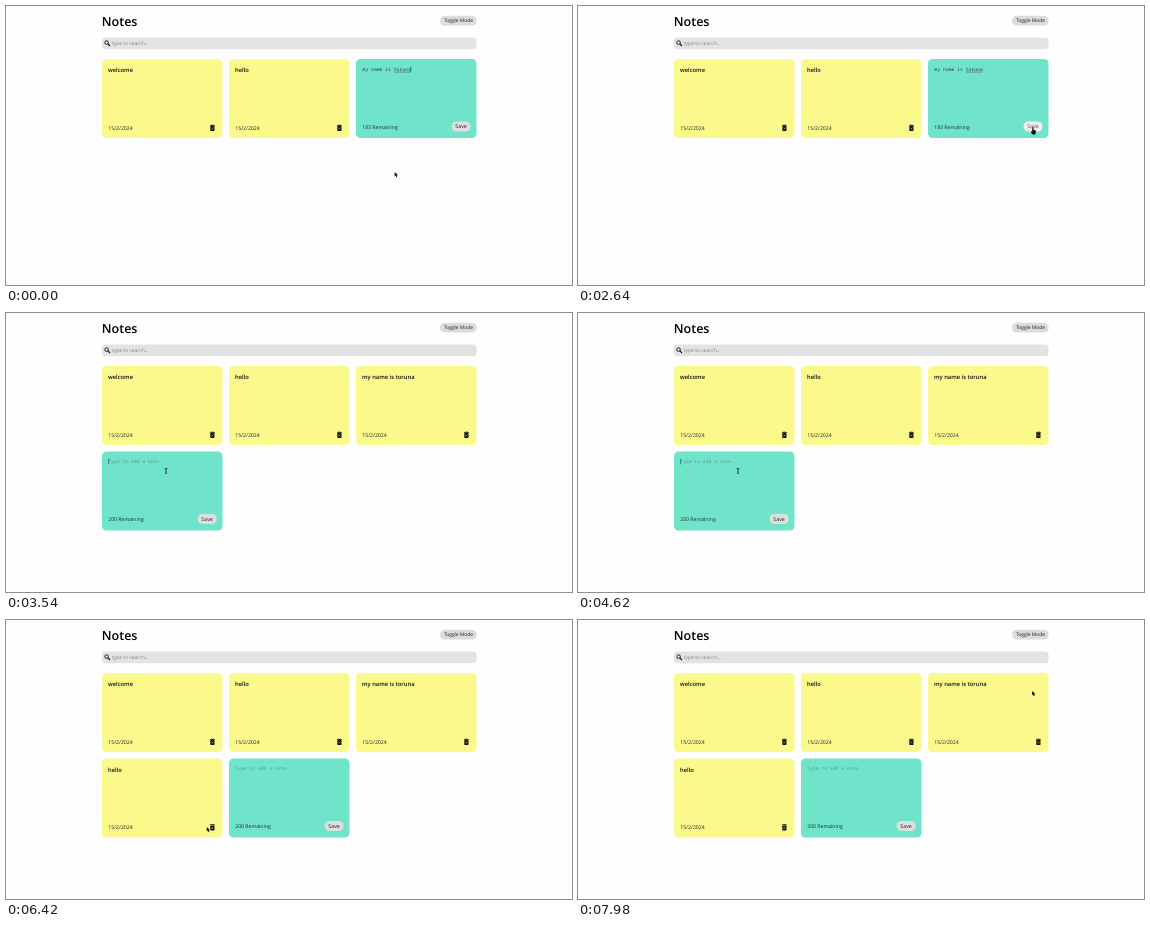
An HTML page with a canvas that plays this animation: 566 px wide and 279 px high, repeating every 8 s.

```html
<!DOCTYPE html>
<html lang="en">
<head>
<meta charset="utf-8">
<title>Notes</title>
<style>
  html, body { margin: 0; width: 100%; height: 100%; overflow: hidden; background: #fefefe; }
  canvas { display: block; width: 566px; height: 279px; }
</style>
</head>
<body>
<canvas id="stage"></canvas>
<script>
const W = 566, H = 279, LOOP = 8000;
const SANS = '"Open Sans", "Noto Sans", sans-serif';
const MONO = '"Noto Sans Mono", "DejaVu Sans Mono", monospace';
const CHAR = 2.84, MONO_SIZE = CHAR / 0.6;
const COLS = [96, 223, 350], ROWS = [53, 138.5];
const CARD = { w: 120.5, h: 79 };
const INTRO = 'my name is ', NAME = 'toruna';

const SAVE_1 = 2760, FOCUS = 3420, SAVE_2 = 6400;
const KEYS = [4920, 5130, 5250, 5370, 5490];
const BLINK = 1060;

// pointer stops: time, x, y
const PATH = [
  [0, 388.7, 166], [870, 388.7, 166], [1130, 429.5, 94.5], [1900, 429.5, 94.5],
  [2380, 454.8, 121.3], [2900, 454.8, 121.3], [3330, 160, 158], [5890, 160, 158],
  [6120, 196, 221], [6300, 200.8, 207], [6440, 200.8, 207], [6600, 200.8, 210],
  [6780, 200.8, 210], [7450, 454.2, 71], [LOOP, 454.2, 71]
];

const canvas = document.getElementById('stage');
const ctx = canvas.getContext('2d');
const ratio = window.devicePixelRatio || 1;
canvas.width = Math.round(W * ratio);
canvas.height = Math.round(H * ratio);
ctx.scale(ratio, ratio);
if ('textRendering' in ctx) ctx.textRendering = 'geometricPrecision';

function text(str, x, y, size, color = '#222', weight = 400, family = SANS, align = 'left') {
  ctx.font = `${weight} ${size}px ${family}`;
  ctx.fillStyle = color;
  ctx.textAlign = align;
  ctx.fillText(str, x, y);
}

function box(x, y, w, h, r, color) {
  ctx.fillStyle = color;
  ctx.beginPath();
  ctx.roundRect(x, y, w, h, r);
  ctx.fill();
}

function line(points, color, width) {
  ctx.strokeStyle = color;
  ctx.lineWidth = width;
  ctx.beginPath();
  points.forEach(([x, y]) => ctx.lineTo(x, y));
  ctx.stroke();
}

function shape(points) {
  ctx.beginPath();
  points.forEach(([x, y]) => ctx.lineTo(x, y));
  ctx.closePath();
  ctx.fillStyle = '#000';
  ctx.fill();
}

function header() {
  text('Notes', 95.8, 19.7, 12.5, '#000', 600);
  box(434, 9.8, 36.7, 9.8, 4.9, '#dcdcdc');
  text('Toggle Mode', 452.4, 16.4, 4.9, '#222', 400, SANS, 'center');
  box(95.8, 31.5, 374.8, 11.7, 3.6, '#e3e3e4');
  ctx.strokeStyle = '#111';
  ctx.lineWidth = 0.9;
  ctx.beginPath();
  ctx.arc(100.6, 36.6, 1.8, 0, Math.PI * 2);
  ctx.stroke();
  line([[101.9, 37.9], [104, 40]], '#111', 1.1);
  text('type to search...', 105.8, 38.9, 5, '#858585');
}

function bin(x, y) {
  box(x - 2.1, y - 1.7, 4.2, 4.8, 0.6, '#111');
  box(x - 2.5, y - 2.8, 5, 0.7, 0, '#111');
  box(x - 1.2, y - 3.1, 2.4, 0.6, 0, '#111');
  line([[x - 0.9, y - 0.2], [x + 0.9, y + 1.6]], '#cfcd7a', 0.55);
  line([[x + 0.9, y - 0.2], [x - 0.9, y + 1.6]], '#cfcd7a', 0.55);
}

function note(x, y, str) {
  box(x, y, CARD.w, CARD.h, 4.5, '#fbf98c');
  text(str, x + 6, y + 13.2, 5.8, '#111', 600);
  text('15/2/2024', x + 6.2, y + 70.7, 5.2);
  bin(x + 110.4, y + 68.8);
}

function saveArea(e) {
  return { x: e.x + 95.6, y: e.y + 62.4, w: 19, h: 10.2 };
}

function inside(p, b) {
  return p.x >= b.x && p.x <= b.x + b.w && p.y >= b.y && p.y <= b.y + b.h;
}

function editor(e, hover) {
  const left = e.x + 6.6, base = e.y + 11.7;
  box(e.x, e.y, CARD.w, CARD.h, 4.5, '#70e4ca');
  if (e.value) {
    text(e.value, left, base, MONO_SIZE, '#25443e', 400, MONO);
  } else {
    text('Type to add a note...', left - 0.4, base, MONO_SIZE, '#5b9f91', 400, MONO);
  }
  if (e.misspelt) {
    const start = left + INTRO.length * CHAR;
    line([[start, base + 1.4], [start + NAME.length * CHAR, base + 1.4]], '#4d5f58', 0.6);
  }
  if (e.caret) {
    const cx = left + e.value.length * CHAR;
    line([[cx, base - 4.4], [cx, base + 1.2]], '#222', 0.5);
  }
  text(`${200 - e.value.length} Remaining`, e.x + 6.2, e.y + 69.5, 5.15, '#1d302c');
  const s = saveArea(e);
  box(s.x, s.y, s.w, s.h, 5, hover ? '#eeeeee' : '#dedfdf');
  text('Save', s.x + s.w / 2, s.y + 6.9, 5.3, hover ? '#555' : '#222', 400, SANS, 'center');
}

function editorAt(t) {
  const lit = since => (t - since) % BLINK < 510;
  if (t < SAVE_1) {
    return { x: COLS[2], y: ROWS[0], value: INTRO + NAME, misspelt: true, caret: lit(0) };
  }
  if (t < SAVE_2) {
    const typed = KEYS.filter(k => t >= k);
    return {
      x: COLS[0], y: ROWS[1], value: 'hello'.slice(0, typed.length),
      caret: t >= FOCUS && lit(typed.length ? typed[typed.length - 1] : FOCUS)
    };
  }
  return { x: COLS[1], y: ROWS[1], value: '', caret: false };
}

function pointerAt(t) {
  const i = PATH.findIndex(stop => stop[0] > t);
  const [t0, x0, y0] = PATH[i - 1], [t1, x1, y1] = PATH[i];
  const k = (t - t0) / (t1 - t0), e = k * k * (3 - 2 * k);
  return { x: x0 + (x1 - x0) * e, y: y0 + (y1 - y0) * e };
}

function arrow() {
  shape([[0, 0], [0, 4.5], [1, 3.6], [1.8, 5.3], [2.6, 4.9], [1.9, 3.3], [3.2, 3.2]]);
}

function beam() {
  line([[-1.4, -2.4], [1.4, -2.4]], '#222', 0.7);
  line([[0, -2.4], [0, 2.4]], '#222', 0.9);
  line([[-1.1, 2.4], [1.1, 2.4]], '#222', 0.6);
}

function hand() {
  shape([[-0.5, 0], [0.6, 0], [0.7, 2.5], [2.8, 3.1], [3, 5.2], [2.2, 7.2],
    [-0.3, 7.2], [-1.9, 4.6], [-1.3, 4], [-0.5, 4.7]]);
}

function pointer(p, e, hover) {
  const field = { x: e.x + 6, y: e.y + 6, w: CARD.w - 12, h: 52 };
  ctx.save();
  ctx.translate(p.x, p.y);
  if (hover) hand();
  else if (inside(p, field)) beam();
  else arrow();
  ctx.restore();
}

function draw(t) {
  ctx.fillStyle = '#fefefe';
  ctx.fillRect(0, 0, W, H);
  header();
  note(COLS[0], ROWS[0], 'welcome');
  note(COLS[1], ROWS[0], 'hello');
  if (t >= SAVE_1) note(COLS[2], ROWS[0], INTRO + NAME);
  if (t >= SAVE_2) note(COLS[0], ROWS[1], 'hello');
  const e = editorAt(t), p = pointerAt(t), hover = inside(p, saveArea(e));
  editor(e, hover);
  pointer(p, e, hover);
}

const begin = performance.now();
function tick() {
  draw((performance.now() - begin) % LOOP);
  requestAnimationFrame(tick);
}
tick();
</script>
</body>
</html>
```
